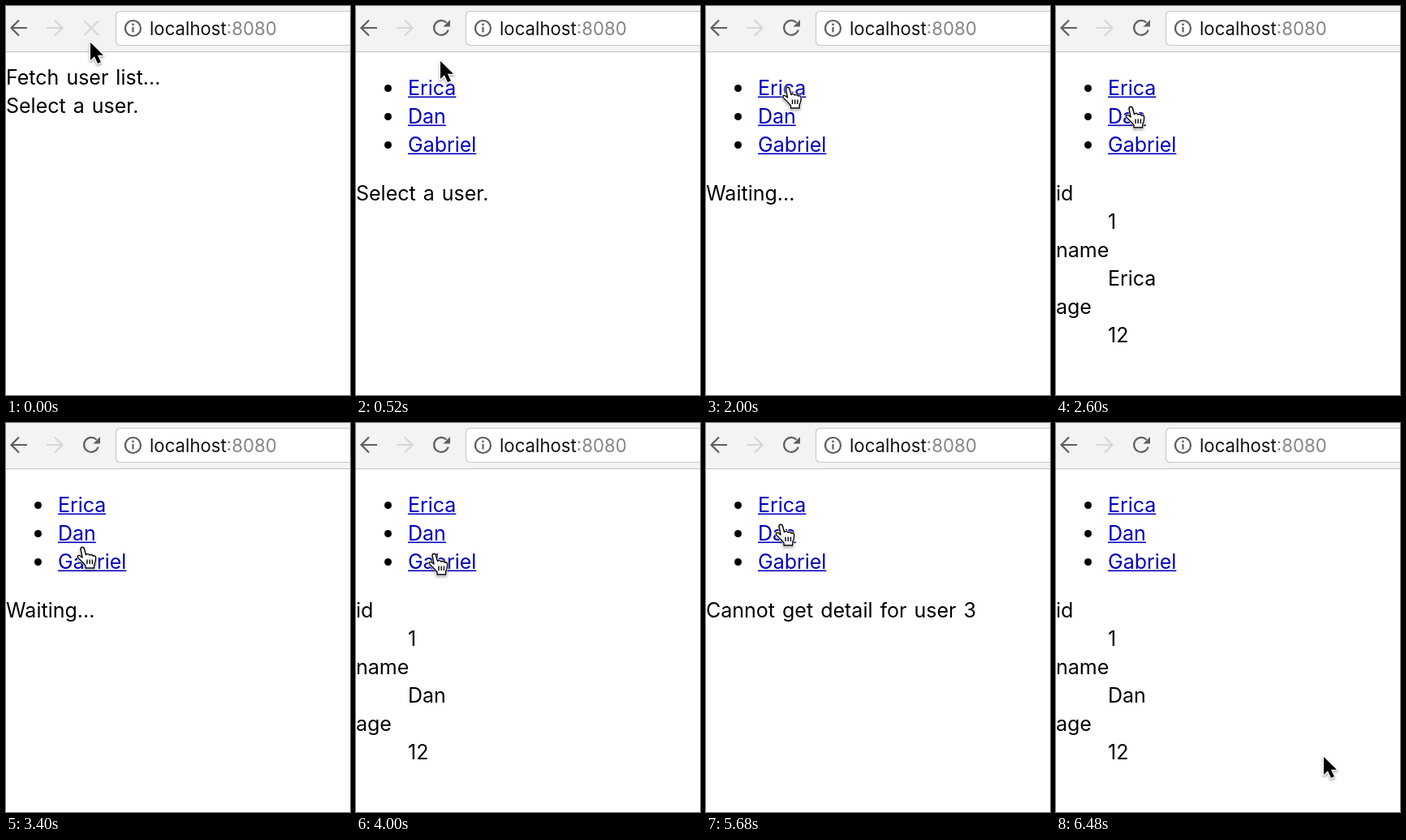
Recreate the animation shown at these times as an HTML page with a canvas. Size 424 by 480 pixels, loop 6520 ms.

```html
<!DOCTYPE html>
<html lang="en">
<head>
<meta charset="utf-8">
<title>User list</title>
<style>
html, body { margin: 0; width: 100%; height: 100%; overflow: hidden; background: #fff; }
canvas { display: block; }
</style>
</head>
<body>
<canvas width="424" height="480"></canvas>
<script>
const ctx = document.querySelector('canvas').getContext('2d');
ctx.wordSpacing = '2px';
const LOOP = 6520;
const users = ['Erica', 'Dan', 'Gabriel'];
const ICON = '#5f5f5f', FAINT = '#d6d6d6', LINK = '#0000be';

// Time, x and y of the pointer tip
const moves = [
  [0, 104, 45], [80, 104, 45], [950, 104, 90], [1750, 104, 90],
  [2450, 92, 124], [3130, 92, 124], [3400, 94, 153], [3900, 96, 161],
  [4300, 96, 161], [4750, 96, 126], [4850, 96, 126], [5500, 92, 125],
  [6300, 92, 125], [6480, 330, 412], [LOOP, 330, 412]
];

// Start time and content below the list: a message, or a user's index
const states = [
  [0, 'Select a user.'], [1720, 'Waiting...'], [2220, 0],
  [3120, 'Waiting...'], [3640, 1], [4290, 'Waiting...'],
  [4780, 'Cannot get detail for user 3'], [5700, 'Waiting...'], [6220, 1]
];

const arrow = new Path2D('M0 0V22l5-4.8 4 8.8 4-1.7-4-8.6h7z');
const hand = new Path2D('M-2 2.5C-2-.5 2-.5 2.5 2.5L4.5 9.5c1-1.5 4-1 4.5.6 ' +
  '1-1.2 3.8-.7 4.2 1 1.5-1 3.5 0 3.5 2.5 0 4-.5 6-2 8.5v3.9H4v-3' +
  'C1.5 20-1 17-5 13.5c-1.8-1.8-.5-3.6 1.8-2.8 1.3.5 2 1.3 3.2 2.3z');
const knuckles = new Path2D('M6 15.5v5.5M9.2 15.5v5.5M12.4 15.5v5.5');

function text(str, x, y, color = '#000', size = 25) {
  ctx.font = `${size}px Inter, sans-serif`;
  ctx.fillStyle = color;
  ctx.fillText(str, x, y);
  return ctx.measureText(str).width;
}

function line(d, color, width = 2.2) {
  ctx.strokeStyle = color;
  ctx.lineWidth = width;
  ctx.stroke(new Path2D(d));
}

function disc(x, y, r, color) {
  ctx.fillStyle = color;
  ctx.beginPath();
  ctx.arc(x, y, r, 0, 7);
  ctx.fill();
}

function toolbar(loading) {
  ctx.fillStyle = '#f3f3f3';
  ctx.fillRect(0, 0, 424, 56);
  ctx.fillStyle = '#c0c0c0';
  ctx.fillRect(0, 56, 424, 1);

  ctx.beginPath();
  ctx.roundRect(135.5, 6.5, 310, 42, 5);
  ctx.fillStyle = '#fff';
  ctx.fill();
  ctx.strokeStyle = '#c8c8c8';
  ctx.lineWidth = 1.2;
  ctx.stroke();

  line('M26 27H7M16 17.5L6.5 27l9.5 9.5', ICON);
  line('M50 27h19M60 17.5l9.5 9.5-9.5 9.5', FAINT);
  if (loading) {
    line('M96.5 18.5l17.5 17.5M114 18.5L96.5 36', FAINT);
  } else {
    line('M113.7 29.5A9 9 0 1 1 111.5 20.5', ICON);
    ctx.fillStyle = ICON;
    ctx.fill(new Path2D('M116 17v8.5h-8.5z'));
  }

  line('M147 27.5a9.5 9.5 0 1 0 19 0a9.5 9.5 0 1 0-19 0M156.5 26v6.5', ICON);
  disc(156.5, 22.8, 1.4, ICON);

  const w = text('localhost', 177, 36, '#111', 22.2);
  text(':8080', 177 + w, 36, '#858585', 22.2);
}

function list() {
  users.forEach((name, i) => {
    const y = 110 + 35 * i;
    disc(39.5, y - 8.5, 4.5, '#000');
    const w = text(name, 64, y, LINK);
    ctx.fillRect(64, y + 1.5, w, 1.6);
  });
}

function detail(user) {
  const rows = { id: '1', name: users[user], age: '12' };
  Object.entries(rows).forEach(([key, value], i) => {
    text(key, 0, 240 + 70 * i);
    text(value, 64, 275 + 70 * i);
  });
}

function pointerAt(t) {
  const i = moves.findIndex(m => m[0] > t);
  const [t0, x0, y0] = moves[i - 1], [t1, x1, y1] = moves[i];
  const p = (t - t0) / (t1 - t0), e = p * p * (3 - 2 * p);
  return [x0 + (x1 - x0) * e, y0 + (y1 - y0) * e];
}

function pointer(x, y, overLink) {
  const shape = overLink ? hand : arrow;
  ctx.save();
  ctx.translate(x, y);
  ctx.lineJoin = 'round';
  ctx.shadowColor = 'rgba(0,0,0,.35)';
  ctx.shadowBlur = 3;
  ctx.shadowOffsetY = 2;
  ctx.strokeStyle = '#fff';
  ctx.lineWidth = 2.6;
  ctx.stroke(shape);
  ctx.shadowColor = 'transparent';
  ctx.fillStyle = overLink ? '#fff' : '#000';
  ctx.fill(shape);
  if (overLink) {
    ctx.strokeStyle = '#000';
    ctx.lineWidth = 1.4;
    ctx.stroke(shape);
    ctx.stroke(knuckles);
  }
  ctx.restore();
}

function draw() {
  const t = performance.now() % LOOP;
  const listed = t >= 520;
  const state = states.findLast(s => s[0] <= t)[1];
  const [x, y] = pointerAt(t);

  ctx.fillStyle = '#fff';
  ctx.fillRect(0, 0, 424, 480);
  toolbar(t < 240);
  if (listed) list();
  else text('Fetch user list...', 0, 97);
  if (typeof state === 'number') detail(state);
  else text(state, 0, listed ? 240 : 132);
  pointer(x, y, listed && x < 148 && y > 83 && y < 190);
  requestAnimationFrame(draw);
}
draw();
</script>
</body>
</html>
```
